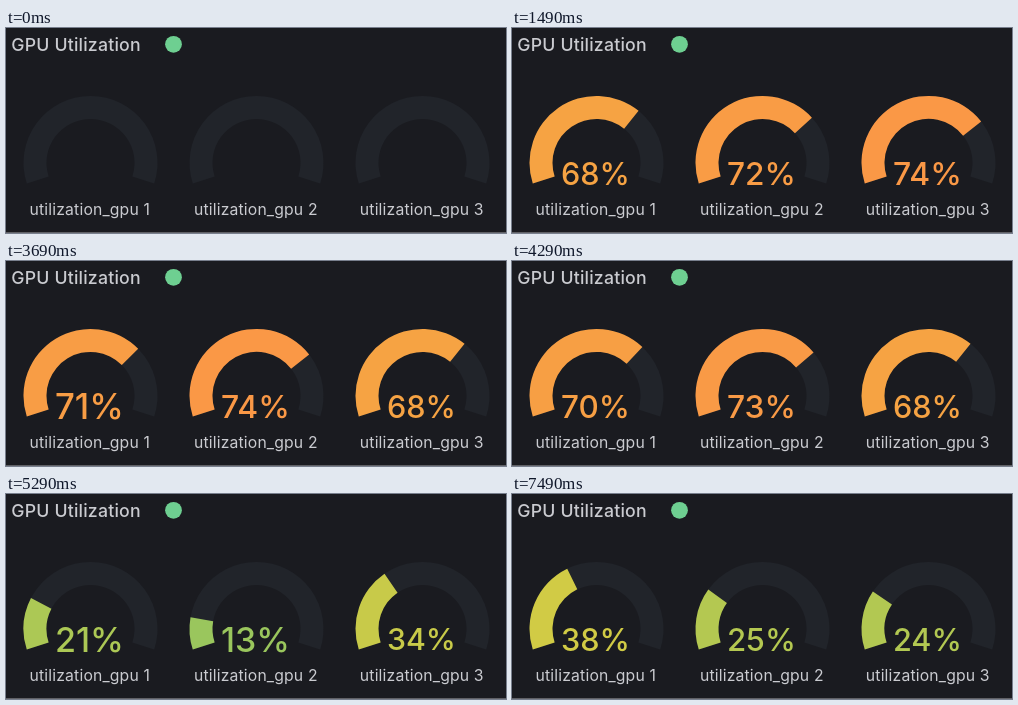
An HTML page that plays this animation: 500 by 205 pixels, repeating every 8000 ms.

```html
<!DOCTYPE html>
<html lang="en">
<head>
<meta charset="utf-8">
<title>GPU Utilization</title>
<style>
  html, body { margin: 0; width: 100%; height: 100%; overflow: hidden; background: #1a1b20; }
  svg { display: block; width: 500px; height: 205px; }
  text { font-family: Inter, sans-serif; fill: #cacbd0; }
  .title { font-size: 17.7px; font-weight: 500; letter-spacing: 0.19px; }
  .label { font-size: 15.75px; letter-spacing: 0.16px; text-anchor: middle; }
  .value { font-weight: 500; text-anchor: middle; }
</style>
</head>
<body>
<svg id="stage" viewBox="0 0 500 205">
  <rect width="500" height="205" fill="#1a1b20"/>
  <rect y="204" width="500" height="1" fill="#606166"/>
  <text class="title" x="5.3" y="22.5">GPU Utilization</text>
  <circle cx="167.5" cy="16.3" r="8.4" fill="#6ecf91"/>
</svg>
<script>
const LOOP = 8000, FIRST = 290, STEP = 400;
const OUTER = 67, INNER = 44, CY = 134.9;
const START = 198, SPAN = 216;
const MAX_SIZE = 37, VALUE_WIDTH = 69;

// time in ms, then the load of each GPU in percent
const load = [
  [0, 0, 0, 0], [FIRST, 2, 0, 15], [1090, 6, 0, 58], [1490, 68, 72, 74],
  [2290, 70, 73, 69], [3490, 71, 74, 68], [4290, 70, 73, 68],
  [4690, 15, 9, 37], [6290, 40, 26, 26], [6690, 40, 26, 26],
  [7490, 38, 25, 24], [LOOP, 38, 25, 24]
];

// percent, then red, green, blue
const ramp = [[0, 126, 196, 105], [40, 213, 203, 67], [58, 239, 181, 63], [74, 250, 152, 70]];

const stage = document.getElementById("stage");

function add(tag, attrs) {
  const el = document.createElementNS("http://www.w3.org/2000/svg", tag);
  for (const key in attrs) el.setAttribute(key, attrs[key]);
  return stage.appendChild(el);
}

// Linear mix of the rows around x, rounded; the first column is the position.
function sample(rows, x) {
  const i = Math.max(1, rows.findIndex(row => row[0] >= x));
  const a = rows[i - 1], b = rows[i];
  const k = (x - a[0]) / (b[0] - a[0]);
  return a.slice(1).map((v, c) => Math.round(v + (b[c + 1] - v) * k));
}

function point(cx, radius, angle) {
  const a = angle * Math.PI / 180;
  return (cx + radius * Math.cos(a)).toFixed(2) + " " +
         (CY - radius * Math.sin(a)).toFixed(2);
}

function band(cx, percent) {
  const sweep = SPAN * percent / 100;
  const end = START - sweep;
  const large = sweep > 180 ? 1 : 0;
  return `M${point(cx, OUTER, START)}` +
    `A${OUTER} ${OUTER} 0 ${large} 1 ${point(cx, OUTER, end)}` +
    `L${point(cx, INNER, end)}` +
    `A${INNER} ${INNER} 0 ${large} 0 ${point(cx, INNER, START)}Z`;
}

const gauges = [0, 1, 2].map(i => {
  const cx = 84.5 + 166 * i;
  add("path", { d: band(cx, 100), fill: "#21242a" });
  const arc = add("path", {});
  const value = add("text", { class: "value", x: cx - 1.1 });
  const label = add("text", { class: "label", x: cx - 0.7, y: 187 });
  label.textContent = "utilization_gpu " + (i + 1);
  return { cx, arc, value, shown: null };
});

// Picks the largest font size at which the value fits inside the arc.
function fit(value) {
  value.style.fontSize = MAX_SIZE + "px";
  const width = value.getComputedTextLength();
  const size = MAX_SIZE * Math.min(1, VALUE_WIDTH / width);
  value.style.fontSize = size + "px";
  value.setAttribute("y", 145.2 + 0.37 * size);
}

function show(gauge, percent) {
  if (gauge.shown === percent) return;
  gauge.shown = percent;
  const { cx, arc, value } = gauge;
  const fill = `rgb(${sample(ramp, percent)})`;
  arc.setAttribute("d", percent ? band(cx, percent) : "");
  arc.setAttribute("fill", fill);
  value.textContent = percent ? percent + "%" : "";
  value.style.fill = fill;
  if (percent) fit(value);
}

function draw(time) {
  const polled = FIRST + Math.floor((time - FIRST) / STEP) * STEP;
  const row = sample(load, Math.max(0, polled));
  gauges.forEach((gauge, i) => show(gauge, row[i]));
}

const begin = performance.now();
function tick() {
  draw((performance.now() - begin) % LOOP);
  requestAnimationFrame(tick);
}
tick();
</script>
</body>
</html>
```
